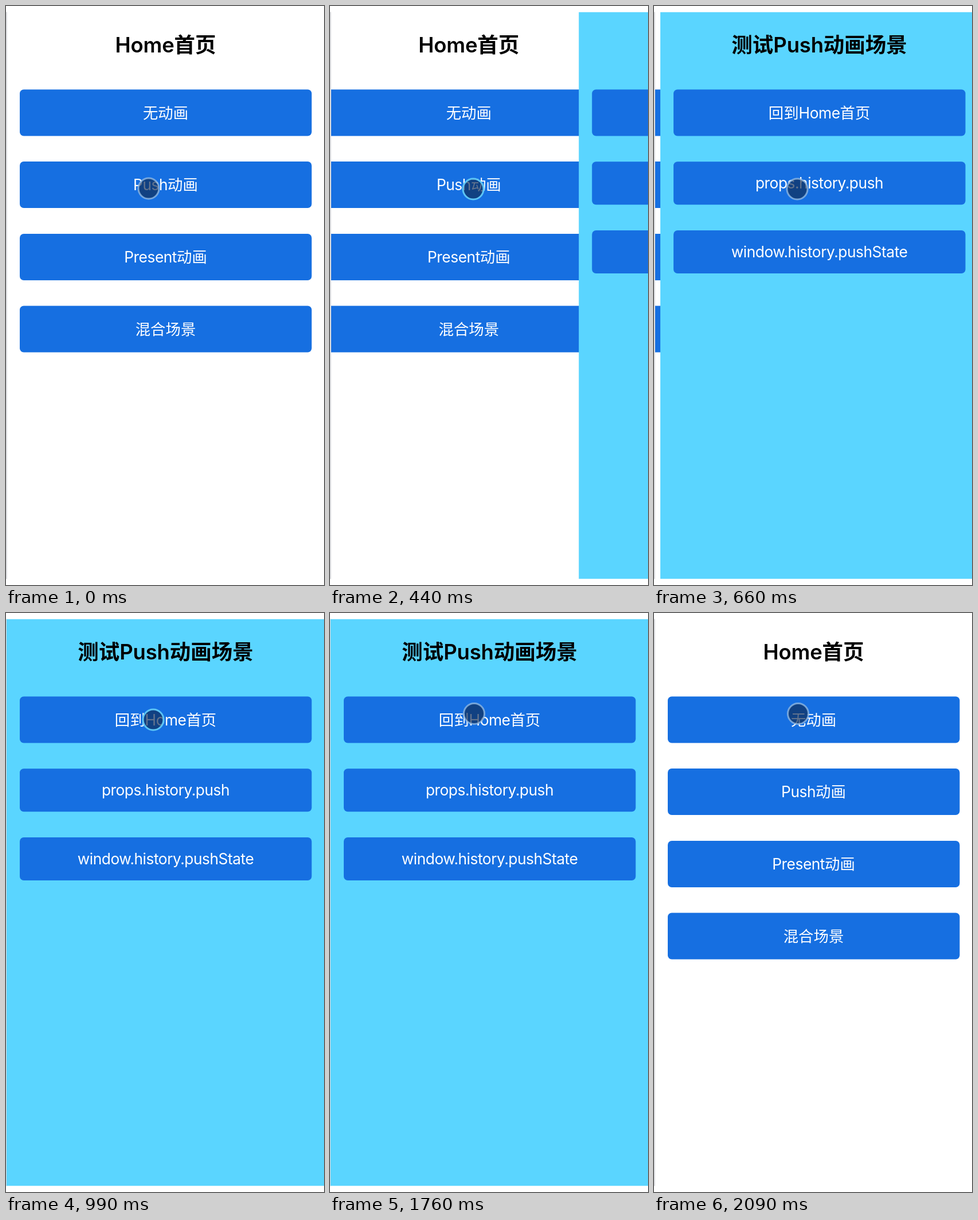
Animation, 555 px wide and 1009 px high, one loop 2.2 s. Source, as an HTML page with a canvas:

```html
<!DOCTYPE html>
<html lang="zh-CN">
<head>
<meta charset="utf-8">
<style>
html, body { margin: 0; width: 100%; height: 100%; overflow: hidden; background: #fff; }
canvas { display: block; }
</style>
</head>
<body>
<canvas id="stage" width="555" height="1009"></canvas>
<script>
const ctx = document.getElementById('stage').getContext('2d');
const LOOP = 2200, STEP = 110, SLIDE = 290;
const WIDTH = 554, TOP = 10.5, BOTTOM = 998.5, MID = 278.5;
const FONTS = 'Inter, "Noto Sans CJK SC", "Noto Sans CJK", sans-serif';

const home = {
  title: 'Home首页', bg: '#fff', left: 2,
  buttons: [['无动画', 145.5, 81], ['Push动画', 271, 81], ['Present动画', 397, 81], ['混合场景', 522.5, 81]]
};
const detail = {
  title: '测试Push动画场景', bg: '#5ad5ff', left: 1,
  buttons: [['回到Home首页', 145.5, 81], ['props.history.push', 271.3, 75], ['window.history.pushState', 391, 75]]
};

// cursor path: time, x, y
const path = [[0, 249, 318], [110, 250, 319], [700, 250, 319], [990, 257, 186], [1100, 257, 186], [1430, 251.5, 175.5], [LOOP, 251.5, 175.5]];

const clamp = v => Math.min(1, Math.max(0, v));
const smooth = v => v * v * (3 - 2 * v);

// cubic-bezier(0, 0, .58, 1)
function easeOut(x) {
  let lo = 0, hi = 1;
  for (let i = 0; i < 24; i++) {
    const u = (lo + hi) / 2;
    if (1.74 * u * u * (1 - u) + u * u * u < x) lo = u; else hi = u;
  }
  return smooth(hi);
}

const slide = (t, start) => {
  const x = clamp((t - start) / SLIDE);
  return x === 0 || x === 1 ? x : easeOut(x);
};

// centred line; Latin runs are set a little tighter than Chinese ones
function label(text, x, y, font, tight) {
  ctx.font = font + ' ' + FONTS;
  const runs = text.match(/[\x00-\x7f]+|[^\x00-\x7f]+/g).map(s => {
    const spacing = s.charCodeAt(0) < 128 ? tight + 'px' : '0px';
    ctx.letterSpacing = spacing;
    return { s, spacing, w: ctx.measureText(s).width };
  });
  x -= runs.reduce((sum, r) => sum + r.w, 0) / 2;
  for (const r of runs) {
    ctx.letterSpacing = r.spacing;
    ctx.fillText(r.s, x, y);
    x += r.w;
  }
}

function drawPage(page, dx) {
  ctx.save();
  ctx.beginPath();
  ctx.rect(page.left, TOP, 555, BOTTOM - TOP);
  ctx.clip();
  ctx.translate(dx, 0);
  ctx.fillStyle = page.bg;
  ctx.fillRect(1, TOP, 800, BOTTOM - TOP);
  ctx.fillStyle = '#000';
  label(page.title, MID, 80.5, '600 36.5px', -0.2);
  for (const [text, y, h] of page.buttons) {
    ctx.fillStyle = '#166fe1';
    ctx.beginPath();
    ctx.roundRect(24, y, 509.5, h, 7);
    ctx.fill();
    ctx.fillStyle = '#fff';
    label(text, MID, y + h / 2 + 9.5, '400 26.4px', -0.5);
  }
  ctx.restore();
}

function drawCursor(t) {
  let i = 0;
  while (i < path.length - 2 && t >= path[i + 1][0]) i++;
  const [t0, x0, y0] = path[i], [t1, x1, y1] = path[i + 1];
  const k = smooth(clamp((t - t0) / (t1 - t0)));
  const cyan = (t >= 110 && t < 660) || (t >= 770 && t < 1760);
  ctx.beginPath();
  ctx.arc(x0 + (x1 - x0) * k, y0 + (y1 - y0) * k, 18, 0, Math.PI * 2);
  ctx.fillStyle = 'rgba(14,40,80,.65)';
  ctx.fill();
  ctx.lineWidth = 3;
  ctx.strokeStyle = cyan ? '#5cc4f4' : 'rgba(150,190,230,.75)';
  ctx.stroke();
}

function frame(now) {
  const t = Math.floor((now % LOOP) / STEP) * STEP;
  const shown = slide(t, 400) - slide(t, 1778);
  ctx.fillStyle = '#fff';
  ctx.fillRect(0, 0, 555, 1009);
  ctx.fillStyle = '#dcdde0';
  ctx.fillRect(0, TOP, 2, BOTTOM - TOP);
  drawPage(home, -0.3 * WIDTH * shown);
  if (shown > 0) drawPage(detail, WIDTH * (1 - shown));
  drawCursor(t);
}

const begin = performance.now();
function tick() {
  frame(performance.now() - begin);
  requestAnimationFrame(tick);
}
tick();
</script>
</body>
</html>
```
